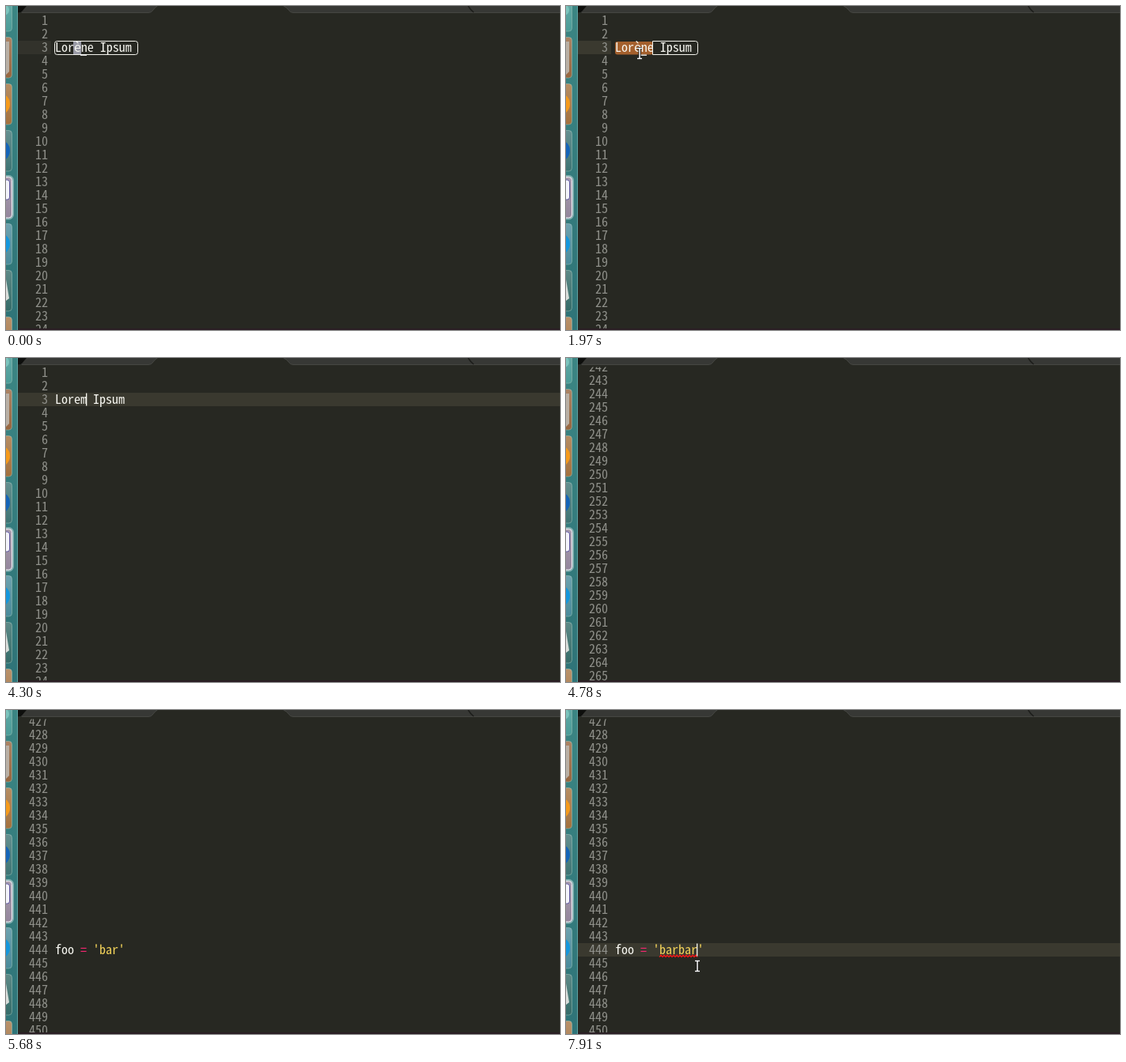
An HTML page for the animation above (8 s loop, 700x410 px).

```html
<!DOCTYPE html>
<html lang="en">
<head>
<meta charset="utf-8">
<title>Editor</title>
<style>
  html, body { margin: 0; width: 100%; height: 100%; overflow: hidden; background: #272822; }
  svg { display: block; }
  text {
    font-family: "Noto Sans Mono CJK JP", "Noto Sans Mono", "DejaVu Sans Mono", monospace;
    font-size: var(--size, 16px); white-space: pre; fill: #f8f8f2;
  }
  .num { fill: #8f908a; text-anchor: end; }
  .op { fill: #f92672; }
  .str { fill: #f3d35a; }
  .item { fill: #4c5052; }
  .hit { fill: #000; font-weight: 700; }
</style>
</head>
<body>
<svg id="stage" width="700" height="410" viewBox="0 0 700 410">
  <defs>
    <linearGradient id="dock" x2="0" y2="1">
      <stop offset="0" stop-color="#3b8583"/>
      <stop offset="1" stop-color="#2f7478"/>
    </linearGradient>
    <linearGradient id="shine" x2="0" y2="1">
      <stop offset="0" stop-color="#fff" stop-opacity=".2"/>
      <stop offset="1" stop-color="#fff" stop-opacity="0"/>
    </linearGradient>
    <clipPath id="view"><rect x="15" y="11.5" width="685" height="396.5"/></clipPath>
  </defs>
  <rect width="700" height="410" fill="#272822"/>
  <g id="tabs">
    <path d="M15 0H192Q188 2 186 5Q184 8.5 180 8.5H15Z" fill="#373835"/>
    <path d="M15 0H26Q23 3 21 6Q19 8.5 15 8.5Z" fill="#0e0f0d"/>
    <path d="M350 0Q355 2 357 5Q359 8.5 363 8.5H700V0Z" fill="#373835"/>
    <path d="M20 8.5H180Q184 8.5 186 5Q188 2 191 0M351 0Q355 2 357 5Q359 8.5 363 8.5H700" fill="none" stroke="#454642"/>
    <path d="M584 0Q587 5 591 8" fill="none" stroke="#1c1d1a" stroke-width="1.5"/>
  </g>
  <g clip-path="url(#view)">
    <g id="content">
      <rect id="band" x="15" height="17" fill="#3a392f"/>
      <rect id="select" x="62" y="45" width="48" height="16.5" rx="3" fill="#a4602d"/>
      <rect id="block" x="85" y="45" width="10" height="16" fill="#9899a5"/>
      <path id="frame" fill="none" stroke="#f4f4ee"/>
      <rect id="mark" x="94" y="61.5" width="8" height="1.3" fill="#fff"/>
      <text id="lorem" x="62" y="58"></text>
      <text id="foo" x="62" y="7555">foo <tspan class="op">=</tspan> <tspan class="str" id="word"></tspan></text>
      <path id="wave" fill="none" stroke="#f01818" stroke-width="1.2"/>
      <rect id="caret" width="1.3" height="16" fill="#f8f8f0"/>
    </g>
    <g id="nums"></g>
  </g>
  <rect x="15" y="408" width="685" height="2" fill="#2a1e24"/>
  <g id="popup"></g>
  <g id="launcher">
    <rect width="15" height="410" fill="url(#dock)"/>
    <rect x="14" width="1" height="410" fill="#5fa3a3"/>
  </g>
  <g id="mouse" fill="none">
    <path d="M-3 -6.5H3M-3 6.5H3M0 -6.5V6.5" stroke="#11120f" stroke-width="3.2"/>
    <path d="M-3 -6.5H3M-3 6.5H3M0 -6.5V6.5" stroke="#fff" stroke-width="1.5"/>
  </g>
</svg>
<script>
const LOOP = 8000, ROW = 17, TOP = 10, LEFT = 62, CW = 8;
const $ = id => document.getElementById(id);
const show = (id, on) => $(id).setAttribute('display', on ? 'inline' : 'none');

function add(parent, tag, attrs, text) {
  const el = document.createElementNS('http://www.w3.org/2000/svg', tag);
  for (const k in attrs) el.setAttribute(k, attrs[k]);
  if (text !== undefined) el.textContent = text;
  parent.appendChild(el);
  return el;
}

// Pick the font size at which one character advances CW pixels
const probe = add($('stage'), 'text', { style: 'font-size: 100px' }, '0000000000');
$('stage').style.setProperty('--size', 1000 * CW / probe.getComputedTextLength() + 'px');
probe.remove();

// Launcher tiles cut off by the left edge
const tiles = ['#4b9c98', '#97663f', '#a4713d', '#3e7474', '#94869c', '#4a8b9b', '#356c69', '#a87747'];
const dock = $('launcher');
tiles.forEach((fill, i) => {
  const y = i * 59 - 20, on = i === 4;
  const box = { x: -44, y: y + .5, width: 51.5, height: 51.5, rx: 4 };
  if (on) add(dock, 'rect', { ...box, fill: 'none', stroke: '#fff', 'stroke-width': 5, opacity: .4 });
  add(dock, 'rect', { ...box, fill, stroke: on ? '#f3eef5' : '#8fb9b0', 'stroke-opacity': on ? 1 : .6 });
  add(dock, 'rect', { ...box, fill: 'url(#shine)' });
});
const disc = (cy, fill) => add(dock, 'circle', { cx: -9, cy, r: 14, fill });
disc(124, '#f59a1b');
disc(183, '#1565b8');
disc(301, '#1597dc');
add(dock, 'circle', { cx: -3, cy: 5, r: 7, fill: '#7cc4bd' });
add(dock, 'path', { d: 'M0 45H4V83L0 87Z', fill: '#b9b0a5' });
add(dock, 'rect', { x: -10, y: 220, width: 14.5, height: 25, rx: 3, fill: '#f4f4fb', stroke: '#5d56a0' });
add(dock, 'path', { d: 'M0 346L4 370L0 373Z', fill: '#d9dedb' });

const nums = Array.from({ length: 26 }, () => add($('nums'), 'text', { class: 'num', x: 53 }));

let zig = 'M118 7558.5';
for (let i = 1; i <= 24; i++) zig += `L${118 + i * 2} ${i % 2 ? 7556 : 7558.5}`;
$('wave').setAttribute('d', zig);

// Completion popup: * marks the next character as a typed one
const long = ['*LOGIN_URL', '*LOGIN_REDIRECT_URL', '*LOGOUT_URL', '*LOGGING', '*LOCALE_PATHS',
  '*LANGUAGES', '*LANGUAGE_CODE', 'TEMP*LATE_DIRS'];
const popups = [
  [0, []],
  [2590, long],
  [2890, ['*L*OGIN_*REDIRECT_URL', '*L*OGIN_U*RL', '*L*OGOUT_U*RL', 'TEMPLATE_*L*OADE*RS']],
  [3000, ['*L*OGIN_*R*EDIRECT_URL']],
  [3180, []]
];
let shown = null;
function fillPopup(list) {
  if (list === shown) return;
  shown = list;
  const g = $('popup');
  g.replaceChildren();
  if (!list.length) return;
  const h = list.length * 21 + 2;
  add(g, 'rect', { x: 73, y: 62, width: 305, height: h + 1.5, fill: '#000', opacity: .35 });
  add(g, 'rect', { x: 73, y: 62, width: 304, height: h, fill: '#3c4650' });
  add(g, 'rect', { x: 75, y: 63, width: 300, height: h - 2.5, fill: '#fcfdfe' });
  add(g, 'rect', { x: 75, y: 63, width: 300, height: 21, fill: '#9aafce' });
  add(g, 'rect', { x: 75, y: 63, width: 300, height: 6, fill: '#a6deec' });
  list.forEach((item, i) => {
    const line = add(g, 'text', { class: 'item', x: 79, y: 78 + i * 21 });
    for (const [, star, ch] of item.matchAll(/(\*?)(.)/g)) add(line, 'tspan', star ? { class: 'hit' } : {}, ch);
  });
}

// [time, value]: the last entry reached holds
const at = (steps, t) => steps.reduce((v, s) => t >= s[0] ? s[1] : v, steps[0][1]);
const heads = [[0, 'Lorène'], [2490, 'L'], [2690, 'Lo'], [2840, 'Lor'], [3000, 'Lore'], [3180, 'Lorem']];
const words = [[0, 'bar'], [7510, 'barb'], [7710, 'barba'], [7910, 'barbar']];

// Pointer path: time, x, y; null hides it
const path = [
  [0, null], [830, 458, 252], [1540, 93, 60], [3480, 93, 60], [3820, 597, 173],
  [4160, 597, 173], [4290, 712, 130], [4300, null], [5970, 482, 402], [6560, 147, 296],
  [6740, 143, 309], [7180, 143, 309], [7230, 166, 324], [LOOP, 166, 324]
];
function pointer(t) {
  let i = 0;
  while (i < path.length - 2 && t >= path[i + 1][0]) i++;
  const [a, x, y] = path[i], [b, u, v] = path[i + 1];
  if (x === null) return null;
  if (u === null) return [x, y];
  const p = (t - a) / (b - a), e = p * p * (3 - 2 * p);
  return [x + (u - x) * e, y + (v - y) * e];
}

// Scrollbar drag that slows down, redrawn every 50 ms
function scrollAt(t) {
  const tick = Math.floor((t - 15) / 50) * 50 + 20;
  const p = Math.min(1, Math.max(0, (tick - 4370) / 1300));
  return Math.round(7246 * (1 - (1 - p) ** 2.272));
}

const fullBox = 'M64.5 44.5H163.5Q166.5 44.5 166.5 47.5V58.5Q166.5 61.5 163.5 61.5H64.5Q61.5 61.5 61.5 58.5V47.5Q61.5 44.5 64.5 44.5Z';
const restBox = 'M109.5 44.5H163.5Q166.5 44.5 166.5 47.5V58.5Q166.5 61.5 163.5 61.5H109.5Z';

function render(t) {
  const s = scrollAt(t), first = Math.floor(s / ROW);
  $('content').setAttribute('transform', `translate(0 ${-s})`);
  nums.forEach((el, i) => {
    el.textContent = first + i + 1;
    el.setAttribute('y', TOP + (first + i) * ROW - s + 14);
  });

  const typing = t >= 2490, picked = t >= 1970 && !typing, low = t >= 5970;
  const head = at(heads, t), word = at(words, t);
  $('lorem').textContent = head + ' Ipsum';
  $('word').textContent = `'${word}'`;

  const band = $('band');
  const wide = t >= 1830 && !picked;
  band.setAttribute('y', low ? 7541 : 44);
  band.setAttribute('width', wide ? 685 : 42);
  band.setAttribute('fill', t < 1830 ? '#32322b' : '#3a392f');
  show('band', !low || t >= 6980);

  show('block', t < 1830);
  show('select', picked);
  show('frame', !typing);
  show('mark', !typing);
  $('frame').setAttribute('d', picked ? restBox : fullBox);
  show('wave', t >= 7910);

  const col = low ? 7 + word.length : typing ? head.length : 4;
  $('caret').setAttribute('x', LEFT + col * CW - 1);
  $('caret').setAttribute('y', low ? 7541.5 : 44.5);
  show('caret', wide && (!low || t >= 6980));

  fillPopup(at(popups, t));

  const m = pointer(t);
  show('mouse', m);
  if (m) $('mouse').setAttribute('transform', `translate(${Math.round(m[0])} ${Math.round(m[1])})`);
}

const t0 = performance.now();
function loop() {
  render((performance.now() - t0) % LOOP);
  requestAnimationFrame(loop);
}
loop();
</script>
</body>
</html>
```
